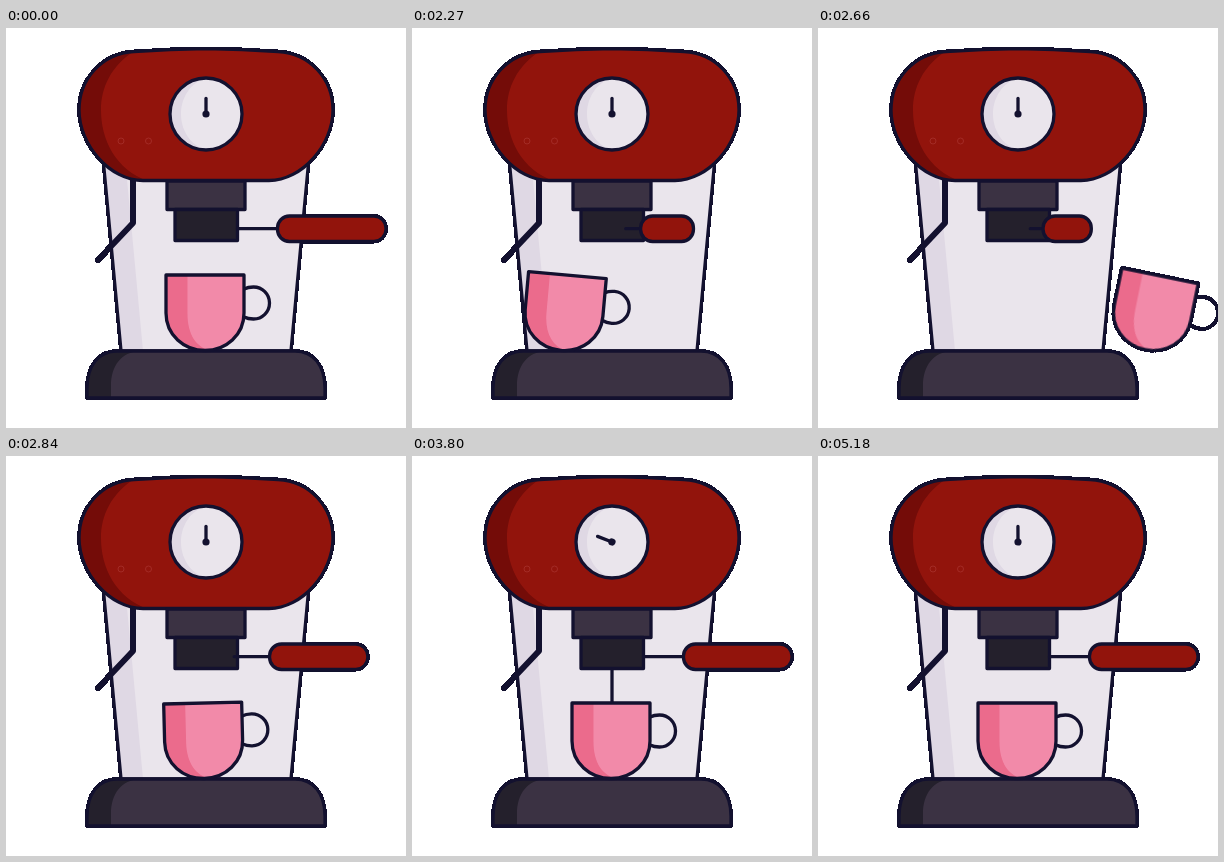
An HTML page for the animation above (5210 ms loop, 400 px wide and 400 px high).

```html
<!DOCTYPE html>
<html lang="en">
<head>
<meta charset="utf-8">
<title>Coffee machine</title>
<style>
  html, body { margin: 0; width: 100%; height: 100%; overflow: hidden; background: #fff; }
  svg { display: block; width: 100%; height: 100%; }
  .line { stroke: #13112f; stroke-width: 3.3; stroke-linejoin: round; stroke-linecap: round; }
  .light { fill: #eae5ec; }
  .shade { fill: #dfd8e4; }
</style>
</head>
<body>
<svg viewBox="0 0 400 400">
  <defs>
    <path id="body" d="M97 130H303L285 323H115Z"/>
    <path id="head" d="M128 23.5Q164 21 200 20.500Q236 21 272 23.500C304 25 327 51 327 82C327 117 296 152.500 263 152.500H137C104 152.500 73 117 73 82C73 51 96 25 128 23.500Z"/>
    <path id="base" d="M81 370V360C81 338 92 323 111 323H289C308 323 319 338 319 360V370Z"/>
    <path id="mug" d="M160 247H238V285C238 307 220 322.500 199 322.500S160 307 160 285Z"/>
    <clipPath id="inHead"><use href="#head"/></clipPath>
    <clipPath id="inBase"><use href="#base"/></clipPath>
    <clipPath id="inMug"><use href="#mug"/></clipPath>
    <!-- hard outer edge against the page -->
    <filter id="hardEdge" filterUnits="userSpaceOnUse" x="0" y="0" width="400" height="400" color-interpolation-filters="sRGB">
      <feComponentTransfer><feFuncA type="discrete" tableValues="0 1 1 1"/></feComponentTransfer>
    </filter>
  </defs>

  <g filter="url(#hardEdge)">
    <use href="#body" class="light"/>
    <path class="shade" d="M97 130H119L137 323H115Z"/>
    <use href="#body" class="line" fill="none"/>

    <!-- steam wand -->
    <path class="line" fill="none" style="stroke-width:6" d="M127 150V195L92 232"/>

    <use href="#head" fill="#92140c"/>
    <path clip-path="url(#inHead)" fill="#740c08" d="M128 23C105 38 95 60 95 82C95 112 110 142 142 153H60V23Z"/>
    <use href="#head" class="line" fill="none"/>
    <g fill="none" stroke="#a8322c" stroke-width=".8">
      <circle cx="115" cy="113" r="3"/>
      <circle cx="142.500" cy="113" r="3"/>
    </g>

    <!-- gauge -->
    <circle class="light" cx="200" cy="86" r="36"/>
    <path class="shade" d="M200 50A36 36 0 0 0 200 122C184 117 175 102 175 86S184 55 200 50Z"/>
    <circle class="line" cx="200" cy="86" r="36" fill="none"/>
    <g id="needle">
      <path class="line" d="M200 86V70.500"/>
      <circle cx="200" cy="86" r="3.600" fill="#13112f"/>
    </g>

    <!-- brewing group -->
    <path class="line" fill="#3b3243" d="M161 153H239V181.500H161Z"/>
    <path class="line" fill="#24202c" d="M169 181.500H231.500V212.500H169Z"/>
    <path id="rod" class="line" fill="none"/>
    <rect id="grip" class="line" y="188" height="25.500" rx="12" fill="#92140c"/>

    <use href="#base" fill="#3b3243"/>
    <path clip-path="url(#inBase)" fill="#24202c" d="M81 323H134C115 324 105 338 105 358V370H81Z"/>
    <use href="#base" class="line" fill="none"/>

    <path id="stream" class="line" fill="none" style="stroke-linecap:butt"/>

    <g id="cup">
      <path class="line" fill="none" d="M238 261Q242 259 247.500 259A16 16 0 0 1 247.500 291Q242 291 238 289"/>
      <use href="#mug" fill="#f28aa9"/>
      <path clip-path="url(#inMug)" fill="#eb6b8c" d="M160 247H181.500V286C181.500 306 190 320 206 323H160Z"/>
      <use href="#mug" class="line" fill="none"/>
    </g>
  </g>
</svg>
<script>
const LOOP = 5210;
const SWAP_START = 2000, CUP_RETURN = 2540;
const BREW_START = 3100, BREW_PEAK = 4155;

const $ = id => document.getElementById(id);
const span = (t, from, to) => Math.min(1, Math.max(0, (t - from) / (to - from)));
const smooth = u => u * u * (3 - 2 * u);
// Falls from 1 to 0, crossing zero at u = 1 / k before it settles.
const settle = (u, k) => (1 - u) ** 2 * (1 - k * u);

function drawHandle(t) {
  const out = Math.sin(span(t, SWAP_START, 2500) * Math.PI / 2);
  const back = smooth(span(t, 2560, 2927));
  const swing = 131 * out * (1 - back);
  const left = 271.5 - 0.435 * swing, right = 380 - swing;
  $('rod').setAttribute('d', `M${231.5 - 0.18 * swing} 200.7H${left}`);
  $('grip').setAttribute('x', left);
  $('grip').setAttribute('width', right - left);
}

function drawCup(t) {
  let x, tilt;
  if (t < CUP_RETURN) {
    const u = span(t, SWAP_START, 2500);
    x = -295 * u ** 3;
    tilt = 17.5 * u ** 2;
  } else {
    const u = span(t, CUP_RETURN, 3000);
    x = 425 * settle(u, 1.57);
    tilt = 43.6 * settle(u, 1.95);
  }
  $('cup').setAttribute('transform', `translate(${x} 0) rotate(${tilt} 199 285)`);
}

function drawBrewing(t) {
  const rise = span(t, BREW_START, BREW_PEAK) - span(t, BREW_PEAK, LOOP);
  $('needle').setAttribute('transform', `rotate(${-93 * smooth(rise)} 200 86)`);

  const top = 213 + 36 * span(t, 4800, 5000);
  const bottom = 213 + 36 * span(t, 3125, 3330);
  $('stream').setAttribute('d', bottom > top ? `M200 ${top}V${bottom}` : '');
}

function frame() {
  const t = performance.now() % LOOP;
  drawHandle(t);
  drawCup(t);
  drawBrewing(t);
  requestAnimationFrame(frame);
}
frame();
</script>
</body>
</html>
```
